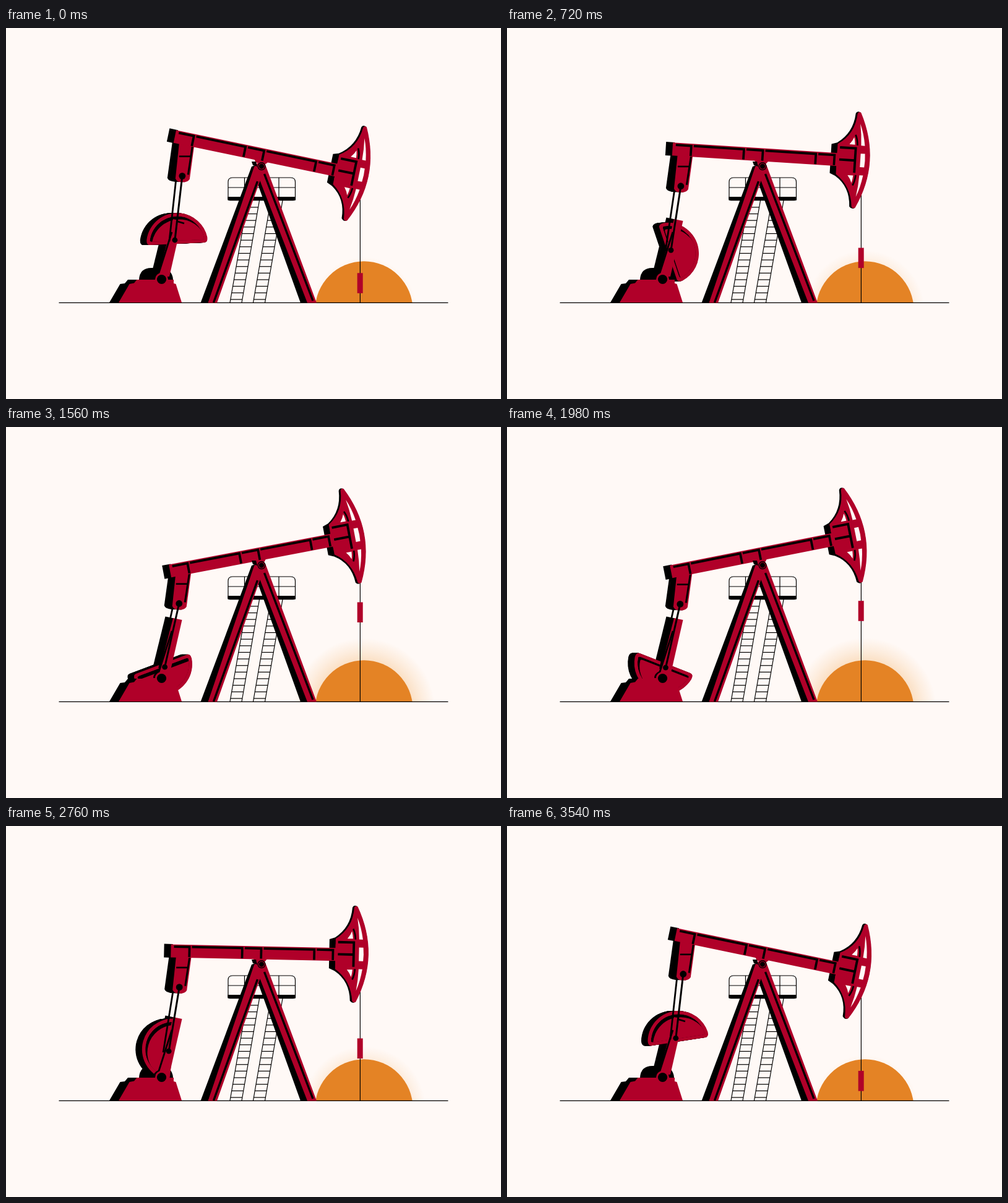
These frames come from a looping animation (800 px wide and 600 px high, 3.6 s). An HTML page with a canvas:

```html
<!DOCTYPE html>
<html lang="en">
<head>
<meta charset="utf-8">
<title>Pumpjack</title>
<style>
html, body { margin: 0; width: 100%; height: 100%; overflow: hidden; background: #fff9f6; }
canvas { display: block; }
</style>
</head>
<body>
<canvas id="stage" width="800" height="600"></canvas>
<script>
const ctx = document.getElementById('stage').getContext('2d');
const RED = '#b00029', BLACK = '#000', PAPER = '#fff9f6', SUN = '#e48325';
const LOOP = 3600, STEP = 60, RAD = Math.PI / 180;
const PIVOT = [413, 223.6], SHAFT = [251.5, 406.5];

function fill(d, color) {
  ctx.fillStyle = color;
  ctx.fill(new Path2D(d));
}

function stroke(d, width, color = BLACK) {
  ctx.strokeStyle = color;
  ctx.lineWidth = width;
  ctx.stroke(new Path2D(d));
}

function dot([x, y], r, color = BLACK) {
  ctx.fillStyle = color;
  ctx.beginPath();
  ctx.arc(x, y, r, 0, 7);
  ctx.fill();
}

function placed([x, y], angle, draw) {
  ctx.save();
  ctx.translate(x, y);
  ctx.rotate(angle);
  draw();
  ctx.restore();
}

function turn(x, y, a) {
  const c = Math.cos(a), s = Math.sin(a);
  return [x * c - y * s, x * s + y * c];
}

function add(p, q) {
  return [p[0] + q[0], p[1] + q[1]];
}

function halfDisc(r, bottom) {
  const path = new Path2D();
  path.arc(0, 0, r, Math.PI + 0.17, -0.17);
  path.quadraticCurveTo(r, bottom, r - 6, bottom);
  path.lineTo(6 - r, bottom);
  path.quadraticCurveTo(-r, bottom, -r * Math.cos(0.17), -r * Math.sin(0.17));
  path.closePath();
  return path;
}
const DISC = halfDisc(49.8, 0), DISC_INSET = halfDisc(44.5, -5);

function sunrise(swing) {
  const grow = 1 - swing, reach = 86 + 15 * grow, alpha = 0.08 + 0.13 * grow;
  const glow = ctx.createRadialGradient(578.5, 456, 72, 578.5, 456, reach);
  glow.addColorStop(0, `rgba(240,160,70,${alpha})`);
  glow.addColorStop(0.55, `rgba(240,160,70,${alpha * 0.4})`);
  glow.addColorStop(1, 'rgba(240,160,70,0)');
  ctx.save();
  ctx.beginPath();
  ctx.rect(400, 300, 400, 144);
  ctx.clip();
  dot([578.5, 456], reach, glow);
  dot([578.5, 456.3], 79, SUN);
  ctx.restore();
  stroke('M85.500 444.400H714.500', 1.2);
}

function ladder(x) {
  stroke(`M${x} 444L${x + 28.5} 279M${x + 19} 444L${x + 47.5} 279`, 1.2);
  for (let i = 0; i < 15; i++) {
    const y = 439 - i * 10.65, left = x + (444 - y) * 0.1727;
    stroke(`M${left} ${y}h19`, 1.2);
  }
}

function platform() {
  ladder(362);
  ladder(399.5);
  stroke('M366 242H460Q467.500 242 467.500 249V278H359V249Q359 242 366 242ZM359 258H467M385.500 242V275M441 242V275', 1.2);
  fill('M358.400 273H468V276Q468 279.300 464 279.300H362Q358.400 279.300 358.400 276Z', BLACK);
}

function frameLegs() {
  fill('M397 224L406 221L327 444.500H314.500Z', BLACK);
  fill('M406 250L411 246L488 444.500H476Z', BLACK);
  fill('M400.500 226Q403 218 412 217Q419 218 421 226L502 444.500H487L410.500 247L341 444.500H326.500Z', RED);
  stroke('M406.500 248L335.500 444M417.500 236L496 441', 3.4);
  fill('M397 216L404 216L406 224L399 222Z', BLACK);
  dot(PIVOT, 6.6, BLACK);
  dot(PIVOT, 5.2, RED);
  dot(PIVOT, 4.2);
}

function head() {
  fill('M109 -43L118 -46Q143 -63 145 -95Q147 -100 152.500 -97Q191.500 -19 152.500 58Q148 61 144 56Q143 24 118 8L109 4Z', BLACK);
  fill('M119 -44Q146 -61 148 -95Q150 -99 153.500 -96.500Q191.500 -19 153.500 57.500Q149 60 147.500 56Q145 23 119 5Z', RED);
  for (const flip of [1, -1]) {
    ctx.save();
    ctx.translate(0, -19.4);
    ctx.scale(1, flip);
    fill('M153.500 -59Q160 -44 163 -24H157Q156.500 -42 153.500 -59Z', PAPER);
    fill('M138 -25Q143 -31 145 -37Q146.500 -32 147 -25Z', PAPER);
    stroke('M147 -41Q150.500 -34 151 -24', 2.6);
    ctx.restore();
  }
  fill('M157 -30.500H164Q165.200 -19 164 -8.500H157Z', PAPER);
}

function beam() {
  head();
  fill('M-158 -29.600H-144V-7.600H-158Z', BLACK);
  fill('M-147 -29H125V-8H-147Z', RED);
  fill('M-14 -9H9L5 -4H-10Z', RED);
  fill('M119 -35H140V-3H119Z', RED);
  const joints = [-146, -117, -31.7, -1, 84.8, 115];
  for (let i = 1; i < joints.length; i++) {
    stroke(`M${joints[i - 1] + 4} -25.500H${joints[i]}V-9`, 3.7);
  }
  stroke('M123 -38.500H148.500V1M123 -18.800H148', 3.8);
}

function hanger(c) {
  placed(c, 0, () => {
    fill('M-15 -62L-24 3Q-23 8 -12 9.500L4 10L2 -62Z', BLACK);
    fill('M-4 -62L-11 4Q-9 10 -1 10H4Q10 9 12 5L20 -54Z', RED);
    stroke('M-5 -31.700H13', 2.6);
    stroke('M16.500 -48L9.500 -2', 3);
  });
}

function gearbox() {
  fill('M215 407Q216 388 235 388H251Q269 390 270 407Z', BLACK);
  fill('M257.500 306.500L272 309.500L250 400L234.500 400Z', BLACK);
}

function post() {
  fill('M270 309L284.500 312L264 402L246 402Z', RED);
  stroke('M268 330L247 396Q239 400 239.500 406', 2.8);
}

function counterweight(pin, angle) {
  const center = add(pin, turn(3.5, 6.2, angle));
  for (let dx = -10.5; dx <= 0; dx += 0.5) {
    placed(add(center, [dx, 0]), angle, () => {
      ctx.fillStyle = dx < 0 ? BLACK : RED;
      ctx.fill(DISC);
    });
  }
  placed(center, angle, () => {
    ctx.clip(DISC_INSET);
    ctx.fillStyle = BLACK;
    ctx.fill(DISC_INSET);
    ctx.rotate(-angle);
    ctx.translate(3.3, 5);
    ctx.rotate(angle);
    ctx.fillStyle = RED;
    ctx.fill(DISC_INSET);
  });
  post();
  placed(center, angle, () => {
    ctx.clip(DISC);
    ctx.rotate(-angle);
    ctx.translate(-center[0], -center[1]);
    stroke('M276 312.500L288 316', 2.6);
  });
}

function base() {
  fill('M167 444L184.500 414L192 413L197 407H215L200 444Z', BLACK);
  fill('M182 444L199.500 414L207 412.500L211.500 407H271V413L274.500 414L284 444Z', RED);
}

function rods(c, pin) {
  stroke(`M${c[0] - 10} ${c[1] + 5}L${pin[0] - 9} ${pin[1] + 2}`, 2.8);
  hanger(c);
  stroke(`M${c}L${pin}`, 3);
  dot(pin, 4.4);
  dot(c, 5.4);
}

function render(time) {
  const swing = Math.cos(time / LOOP * 2 * Math.PI);
  const tilt = 11.8 * swing * RAD;
  const joint = add(add(PIVOT, turn(-118, -12, tilt)), [-15.1, 51.6]);
  const pin = [262.2 + 8.3 * swing + 2.4 * swing * swing, 366.6 - 23.6 * swing];
  const rodLean = Math.atan2(joint[0] - pin[0], pin[1] - joint[1]);
  const weightTop = 337.3 + 59 * swing;

  ctx.fillStyle = PAPER;
  ctx.fillRect(0, 0, 800, 600);
  sunrise(swing);
  platform();

  stroke(`M572.400 ${262 + 13 * swing}V444`, 1.2);
  ctx.fillStyle = RED;
  ctx.fillRect(567.7, weightTop, 9, 32.6);

  gearbox();
  counterweight(pin, (time / LOOP * 360 - 9.3) * RAD + rodLean);
  base();
  dot(SHAFT, 10.5, RED);
  rods(joint, pin);
  dot(SHAFT, 7.6);

  placed(PIVOT, tilt, beam);
  frameLegs();
}

const start = performance.now();
function tick() {
  const elapsed = (performance.now() - start) % LOOP;
  render(Math.floor(elapsed / STEP) * STEP);
  requestAnimationFrame(tick);
}
tick();
</script>
</body>
</html>
```
